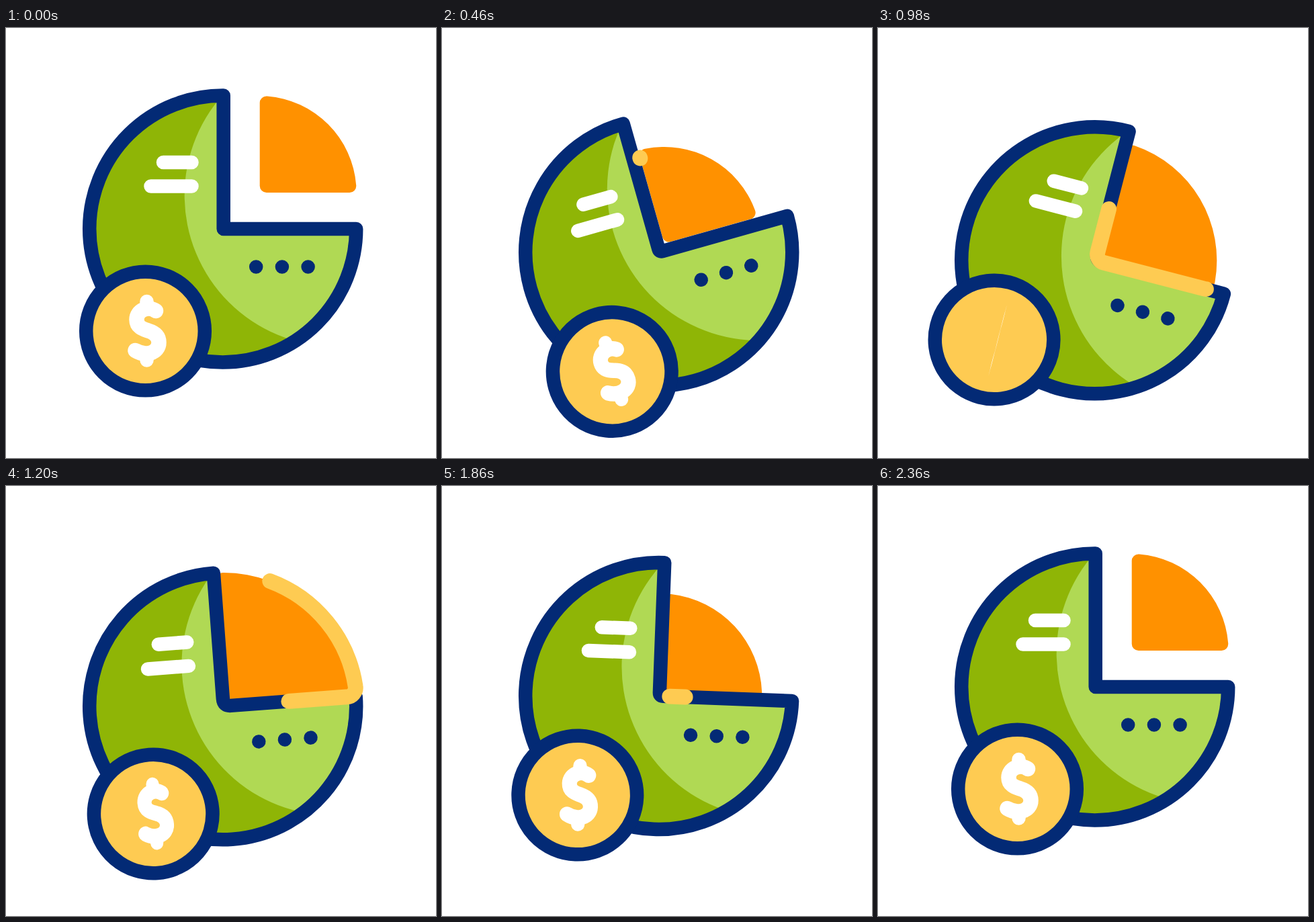
Write an HTML page that moves like this. It is 640 by 640 pixels and loops after 2400 ms.

```html
<!DOCTYPE html>
<html lang="en">
<head>
<meta charset="utf-8">
<title>Pie chart and coin</title>
<style>
  html, body { margin: 0; height: 100%; overflow: hidden; background: #fff; }
  svg { display: block; width: 100vw; height: 100vh; }
  .line { fill: none; stroke-linecap: round; stroke-linejoin: round; }
  .navy { stroke: #032a75; stroke-width: 20.5; }
  .white { stroke: #fff; stroke-width: 20.5; }
</style>
</head>
<body>
<svg viewBox="0 0 640 640">
  <defs>
    <path id="slice" d="M0-133V-10A10 10 0 0 0 10 0H133A10 10 0 0 0 143.5-11A144 144 0 0 0 11-143.5A10 10 0 0 0 0-133Z"/>
    <path id="pie"/>
    <clipPath id="inPie"><use href="#pie"/></clipPath>
  </defs>
  <!-- everything is placed relative to the centre of the pie -->
  <g id="chart">
    <use id="wedge" href="#slice" fill="#ff9100"/>
    <use href="#pie" fill="#8fb506"/>
    <circle cx="167" cy="-50" r="225" fill="#b0d954" clip-path="url(#inPie)"/>
    <use href="#pie" class="line navy"/>
    <path class="line white" d="M-89.7-99H-47.2M-108.2-63.5H-47.2"/>
    <path class="line navy" d="M48.5 56.5h.01M87.2 56.5h.01M125.9 56.5h.01"/>
    <path id="tracer" class="line" stroke="#fecb52" pathLength="1"/>
    <g transform="translate(-116.2 152)">
      <circle r="88.3" fill="#fecb52" class="navy"/>
      <g id="dollar" class="line white">
        <path d="M2-44V-36M2 36V43.5"/>
        <path stroke-width="22.5" style="stroke-width:22.5" d="M15.5-30C4-38-13-31-13-17C-13-5-2-2.5 4-.5C14 2.5 20 8 20 17C20 33 0 38-15 29"/>
      </g>
    </g>
  </g>
</svg>
<script>
const LOOP = 2400;
const $ = id => document.getElementById(id);
const [chart, wedge, pie, tracer, dollar] = ['chart', 'wedge', 'pie', 'tracer', 'dollar'].map($);
tracer.setAttribute('d', $('slice').getAttribute('d'));

// time, value pairs, eased in and out between neighbours
const HEIGHT = [[0, 0], [350, 55], [715, -37.5], [1050, 57.5], [1418, -21], [1790, 15], [2160, 0]];
const TILT = [[0, 0], [377, -18], [920, 16.3], [1290, -7.8], [1740, 4.75], [2000, -1], [2160, 0]];

const ramp = (t, from, to) => Math.min(1, Math.max(0, (t - from) / (to - from)));
const smooth = (t, from, to) => {
  const u = ramp(t, from, to);
  return u * u * (3 - 2 * u);
};

function track(keys, t) {
  let value = keys[0][1];
  for (let i = 1; i < keys.length; i++) {
    const [t0, v0] = keys[i - 1], [t1, v1] = keys[i];
    value += (v1 - v0) * smooth(t, t0, t1);
  }
  return value;
}

function draw(t) {
  chart.setAttribute('transform',
    `translate(323.7 ${299 + track(HEIGHT, t)}) rotate(${track(TILT, t)})`);

  // the inner corner of the pie softens while the slice fills the gap
  const corner = 11 * (smooth(t, 0, 1000) - smooth(t, 1500, 2200));
  pie.setAttribute('d',
    `M${corner} 0Q0 0 0 ${-corner}V-198.5A198.5 198.5 0 1 0 197.5 0Z`);

  // the slice moves in, grows to fill the gap, shrinks and moves out
  const out = 1 - smooth(t, 0, 640) + 1 - (1 - ramp(t, 1870, 2360)) ** 2.5;
  const scale = 1 + 0.38 * (ramp(t, 585, 1175) - ramp(t, 1366, 1954));
  const place = `translate(${54 * out} ${-54 * out}) scale(${scale})`;
  wedge.setAttribute('transform', place);

  // a line runs once and a third around the slice
  const shift = smooth(t, 440, 1950) / 3;
  const tail = smooth(t, 836, 2010);
  const length = Math.max(0.001, smooth(t, 425, 1650) - tail);
  tracer.setAttribute('transform', place);
  tracer.setAttribute('stroke-width', 22.8 / scale);
  tracer.setAttribute('stroke-dasharray', `${length} ${1 - length}`);
  tracer.setAttribute('stroke-dashoffset', -((tail + shift) % 1));
  tracer.setAttribute('visibility', t > 440 && t < 2005 ? 'visible' : 'hidden');

  // four half turns of the dollar sign
  const turn = Math.cos(4 * Math.PI * ramp(t, 440, 1880));
  dollar.setAttribute('transform', `translate(5.2 0) scale(${turn} 1) translate(-5.2 0)`);
}

function frame() {
  draw(performance.now() % LOOP);
  requestAnimationFrame(frame);
}
frame();
</script>
</body>
</html>
```
